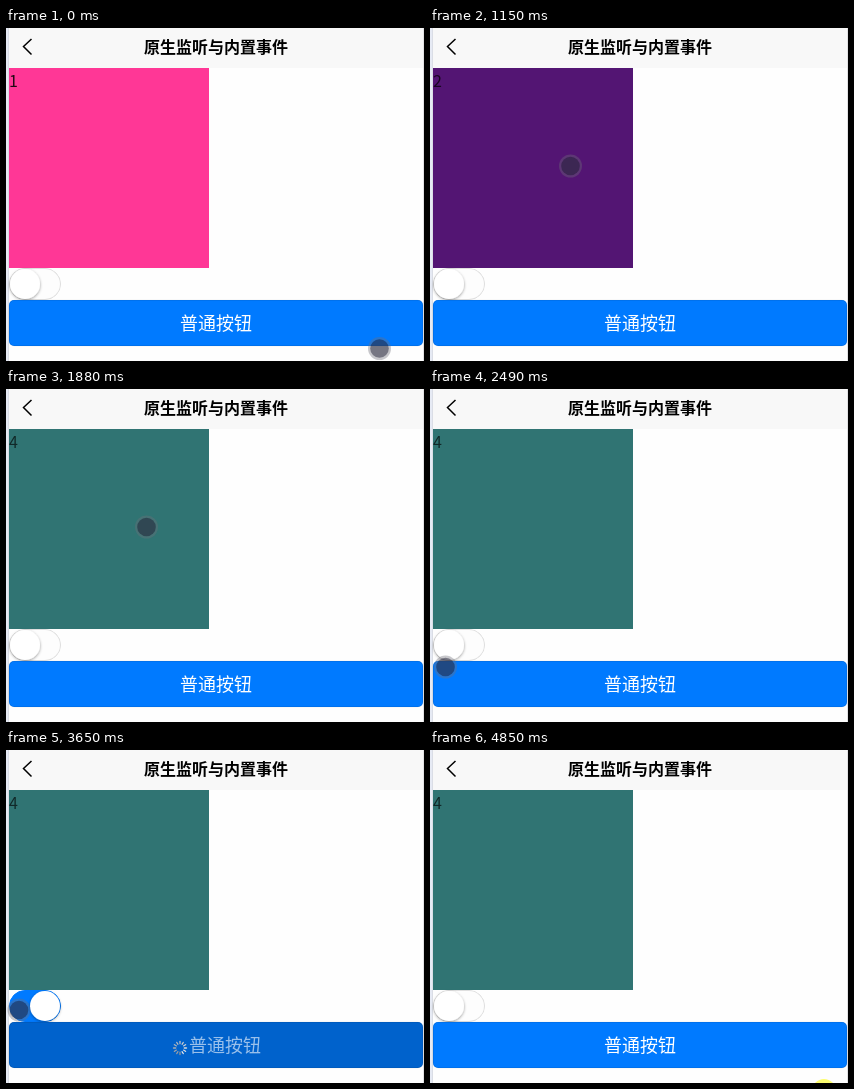
An HTML page that plays this animation: 418x333 px, repeating every 4980 ms.

```html
<!DOCTYPE html>
<html lang="zh-CN">
<head>
<meta charset="utf-8">
<style>
  html, body { margin: 0; width: 100%; height: 100%; overflow: hidden; background: #fff; }
  svg { display: block; width: 418px; height: 333px; }
  text { font-family: "Noto Sans CJK SC", "Noto Sans CJK", "Noto Sans", sans-serif; }
</style>
</head>
<body>
<svg viewBox="0 0 418 333">
  <defs>
    <filter id="shadow" x="-30%" y="-30%" width="160%" height="160%">
      <feDropShadow dx="0" dy="1" stdDeviation="1.5" flood-opacity=".4"/>
    </filter>
  </defs>
  <rect width="418" height="333" fill="#fefefe"/>
  <rect x="3" width="414" height="40" fill="#f8f8f8"/>
  <rect width="3" height="333" fill="#e6eaf4"/>
  <rect x="2" width="1" height="333" fill="#dadde5"/>
  <rect x="417" width="1" height="333" fill="#e2e2e4"/>
  <path d="M25.5 11L17.5 18.5L25.5 26.5" fill="none" stroke="#000" stroke-width="1.5"/>
  <text x="210" y="25" font-size="16" font-weight="700" text-anchor="middle">原生监听与内置事件</text>

  <rect id="box" x="3" y="40" width="200" height="200"/>
  <text id="count" x="3" y="59" font-size="16"></text>

  <rect id="track" x="3.5" y="240.5" width="51" height="31" rx="15.5"/>
  <rect id="cover" x="-25" y="-15" width="50" height="30" rx="15" fill="#fdfdfd"/>
  <circle id="knob" cy="256" r="15" fill="#fff" filter="url(#shadow)"/>

  <rect id="button" x="3" y="272" width="414" height="46" rx="5"/>
  <rect x="3.25" y="272.25" width="413.5" height="45.5" rx="5" fill="none" stroke="#000" stroke-opacity=".2" stroke-width=".5"/>
  <g id="spinner"></g>
  <text id="label" y="302" font-size="18" text-anchor="middle" fill="#fff">普通按钮</text>

  <g id="cursor">
    <circle r="11.5" fill="#6e6e78" fill-opacity=".38"/>
    <circle id="core" r="9.3" fill="#14142a"/>
  </g>
  <circle id="glow" cx="394" cy="341" r="12" fill="#fdfd70"/>
</svg>
<script>
const LOOP = 4980, ON = 3170, OFF = 4050, FRAME = 67.6;
const $ = id => document.getElementById(id);
const set = (id, attrs) => {
  for (const name in attrs) $(id).setAttribute(name, attrs[name]);
};
const clamp = v => Math.min(1, Math.max(0, v));
const between = (t, a, b) => t >= a && t < b;

const boxes = [
  { from: 0, fill: '#ff3796', ink: .88 },
  { from: 950, fill: '#531573', ink: .72 },
  { from: 1350, fill: '#756416', ink: .7 },
  { from: 1880, fill: '#307473', ink: .65 }
];
const presses = [[620, 750], [1090, 1150], [1610, 1680], [2900, 2970], [3780, 3850]];
const descent = [[140.5, 138], [129, 150], [96, 190], [58, 238], [28, 272],
  [17, 282], [15.5, 278], [14, 272], [14, 266]];

for (let i = 0; i < 12; i++) {
  const bar = document.createElementNS('http://www.w3.org/2000/svg', 'rect');
  const grey = i ? Math.round(152 + (i - 1) * 7.4) : 233;
  const attrs = { x: -.63, y: -7.2, width: 1.26, height: 3.6, rx: .8,
    fill: `rgb(${grey},${grey},${grey})`, transform: `rotate(${i * 30})` };
  for (const name in attrs) bar.setAttribute(name, attrs[name]);
  $('spinner').append(bar);
}

// CSS "ease": cubic-bezier(.25, .1, .25, 1)
function ease(x) {
  let lo = 0, hi = 1;
  const curve = (a, b, u) => 3 * a * u * (1 - u) ** 2 + 3 * b * u * u * (1 - u) + u ** 3;
  for (let i = 0; i < 20; i++) {
    const mid = (lo + hi) / 2;
    if (curve(.25, .25, mid) < x) lo = mid; else hi = mid;
  }
  return curve(.1, 1, lo);
}

const stepCount = (t, start) => Math.min(8, Math.max(0, Math.floor((t - start) / 68.5) + 1));

function cursorAt(t) {
  if (t < 2140) {
    const p = stepCount(t, 70) / 8, s = p * p * (3 - 2 * p);
    return [373.5 - 233 * s, 320.5 - 182.5 * s];
  }
  if (t < 2700) return descent[stepCount(t, 2140)];
  return t < 2770 ? [13, 262] : [13, 260];
}

function drawSwitch(t) {
  const on = between(t, ON, OFF);
  const p = t < OFF ? ease(clamp((t - ON) / 300)) : 1 - ease(clamp((t - OFF) / 270));
  const tint = t < OFF ? clamp((t - ON) / 100) : 1 - clamp((t - OFF) / 100);
  const mix = (a, b) => Math.round(a + (b - a) * tint);
  const edge = `rgb(${mix(223, 0)},${mix(223, 122)},${mix(223, 255)})`;
  set('track', { fill: edge, stroke: edge });
  set('cover', { transform: `translate(29 256) scale(${1 - p})` });
  set('knob', { cx: 19 + 20 * p });
  set('button', { fill: on ? '#0062cc' : '#007aff' });
  set('label', { x: on ? 219 : 210, 'fill-opacity': on ? .6 : 1 });
  const turn = Math.floor((t - ON) / (1000 / 12)) * 30;
  set('spinner', { visibility: on ? 'visible' : 'hidden',
    transform: `translate(174 298) rotate(${turn})` });
}

function draw(t) {
  const index = boxes.filter(b => t >= b.from).length - 1;
  set('box', { fill: boxes[index].fill });
  set('count', { 'fill-opacity': boxes[index].ink });
  $('count').textContent = index + 1;

  const held = t < ON ? t : ON + Math.floor((t - ON) / FRAME) * FRAME;
  drawSwitch(held);

  const pressed = presses.some(([a, b]) => between(t, a, b));
  set('cursor', { transform: `translate(${cursorAt(t)})`,
    visibility: t < 4250 ? 'visible' : 'hidden' });
  set('core', { 'fill-opacity': pressed ? .65 : .45 });
  set('glow', { visibility: t >= 4850 ? 'visible' : 'hidden' });
}

const start = performance.now();
function tick() {
  draw((performance.now() - start) % LOOP);
  requestAnimationFrame(tick);
}
tick();
</script>
</body>
</html>
```
